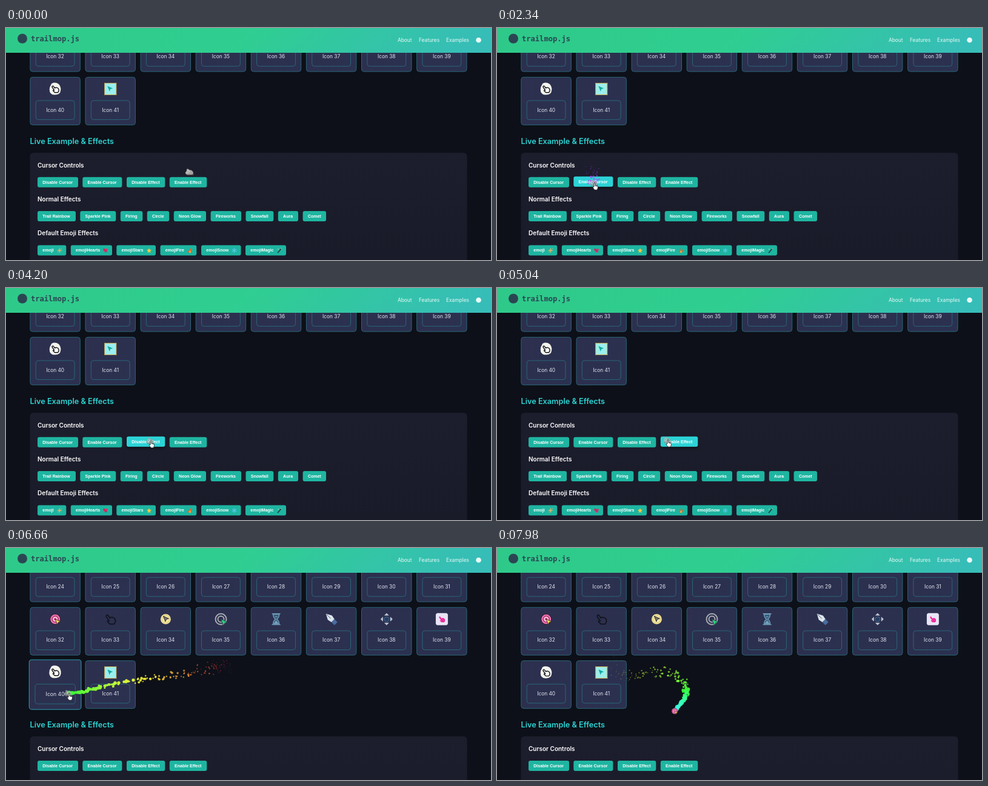
These frames come from a looping animation (800x384 px, 8 s). An HTML page with a canvas:

```html
<!DOCTYPE html>
<html lang="en">
<head>
<meta charset="utf-8">
<title>Cursor effects</title>
<style>
  html, body { margin: 0; width: 100%; height: 100%; overflow: hidden; background: #0d1018; }
  svg, canvas { position: absolute; left: 0; top: 0; width: 800px; height: 384px; }
  text { font-family: Inter, sans-serif; }
  .card { fill: url(#cardFill); stroke: #2a6577; stroke-width: 1; }
  .inner { fill: none; stroke: #296d7c; stroke-width: .9; }
  .label { fill: #e6e8f0; font-size: 8.33px; text-anchor: middle; }
  .on .card { stroke: #2c9db0; }
  .button rect { fill: #1eb5a1; }
  .button text { fill: #fff; font: bold 7px "Liberation Sans", Arial, sans-serif; }
  .button.on { filter: drop-shadow(0 2px 2px #0008); }
  .button.on rect { fill: #2cd3d6; }
  .h2 { fill: #2dd4d4; font-size: 12.7px; font-weight: 600; }
  .h3 { fill: #fff; font-size: 10px; font-weight: 600; }
  .nav { fill: #e9fbf7; font-size: 8.33px; }
  .brand { fill: #2b4653; font: bold 12.1px "DejaVu Sans Mono", monospace; }
</style>
</head>
<body>
<svg viewBox="0 0 800 384">
  <defs>
    <linearGradient id="bar" x1="0" y1="0" x2="1" y2=".05">
      <stop stop-color="#2ec989"/><stop offset=".5" stop-color="#2fce90"/><stop offset="1" stop-color="#37bdb8"/>
    </linearGradient>
    <linearGradient id="cardFill" x1="0" y1="0" x2="1" y2="1">
      <stop stop-color="#2d2f4e"/><stop offset="1" stop-color="#2b3150"/>
    </linearGradient>
    <linearGradient id="panelFill" x1="0" y1="0" x2="0" y2="1">
      <stop stop-color="#1d1e2d"/><stop offset="1" stop-color="#191a28"/>
    </linearGradient>
    <path id="arrow" d="M0 0L9 4L5 5.2L3.5 9Z"/>
    <path id="point" d="M-7-6Q-5-8-3.500-5.500L-1-2Q3-5 7-1Q10 4 6 8L-1 8L-5 4Q-5 2-2 3L-7-4Z" stroke-linejoin="round"/>
    <g id="icon32">
      <circle r="8.500" fill="#f678b5" stroke="#322034" stroke-width="1.2"/>
      <circle r="5" fill="#ffc0d8" stroke="#a72c69" stroke-width="1.5"/><circle r="2" fill="#c92c75"/>
      <use href="#arrow" fill="#ffe15a" stroke="#3a2630" stroke-width=".9"/>
    </g>
    <g id="icon33"><use href="#point" fill="none" stroke="#11131b" stroke-width="1.7"/></g>
    <g id="icon34">
      <circle r="8.500" fill="#f3e6a1"/><circle r="6.500" fill="none" stroke="#d9c568"/>
      <use href="#arrow" x="-4" y="-5" fill="#77736a" stroke="#34343a"/>
    </g>
    <g id="icon35">
      <circle r="9" fill="none" stroke="#a7abb0" stroke-width="2"/>
      <circle r="5" fill="none" stroke="#a7abb0" stroke-width="2"/>
      <use href="#arrow" transform="scale(1.2)" fill="#2bd478" stroke="#2b3050" stroke-width=".7"/>
    </g>
    <g id="icon36" stroke="#6d99b5" stroke-width="1.500">
      <path d="M-7-9H7M-7 9H7"/>
      <path d="M-5-8Q-5-3-1 0Q-5 3-5 8H5Q5 3 1 0Q5-3 5-8Z" fill="#315673"/>
      <path d="M-3 7L0 3L3 7ZM-2-4H2" fill="#7fb4cf"/>
    </g>
    <g id="icon37">
      <path d="M-9-9L1-6L5 0L0 5L-6 1Z" fill="#dce6ed"/><path d="M-8-8L-1-1" stroke="#516072"/>
      <path d="M5 0L10 5L5 10L0 5Z" fill="#4a6da0"/>
    </g>
    <g id="icon38" fill="#bdc7d1">
      <path d="M-4-6L0-10L4-6ZM-4 6L0 10L4 6ZM-6-4L-10 0L-6 4ZM6-4L10 0L6 4Z"/>
      <circle r="4" fill="#263d63" stroke="#4b6b91"/>
    </g>
    <g id="icon39">
      <rect x="-10" y="-10" width="20" height="20" rx="3.500" fill="#e8e4f5"/>
      <use href="#point" transform="scale(.65)" fill="#ed2f9b"/>
    </g>
    <g id="icon40">
      <path d="M-6-9Q0-12 6-8Q11-2 8 6Q4 11-5 9Q-11 6-9-3Z" fill="#f4f4ee"/>
      <use href="#point" transform="scale(.72)" fill="#fff" stroke="#17181c" stroke-width="2"/>
    </g>
    <g id="icon41">
      <rect x="-9.500" y="-9.500" width="19" height="19" fill="#9ceeed" stroke="#d7b85b"/>
      <path d="M-10-10h.1M0-10h.1M10-10h.1M-10 0h.1M10 0h.1M-10 10h.1M0 10h.1M10 10h.1" stroke="#edb83f" stroke-width="3"/>
      <use href="#arrow" x="-5" y="-5" fill="#15aaa2"/>
    </g>
    <g id="sparkles" fill="#d5b06f"><path d="M0-4L1-1L4 0L1 1L0 4L-1 1L-4 0L-1-1ZM3-4v2M2-3h2M-3 2v2" stroke="#d5b06f" stroke-width=".5"/></g>
    <g id="heart"><path d="M0 4L-4-1Q-3-5 0-2Q3-5 4-1Z" fill="#e12f6b"/><path d="M-3-3L3 3" stroke="#8d244e"/></g>
    <g id="star"><path d="M0-4L1.300-1.400L4-1L2 1L2.500 4L0 2.600L-2.500 4L-2 1L-4-1L-1.300-1.400Z" fill="#f2c443"/></g>
    <g id="fire"><path d="M0-4Q4-1 3 2Q2 4 0 4Q-4 4-3 0L-1 1Z" fill="#dd6931"/><path d="M0 0Q3 3 0 4Q-2 3 0 0Z" fill="#f4bd52"/></g>
    <g id="snow"><path d="M0-4V4M-3.500-2L3.500 2M-3.500 2L3.500-2" stroke="#5bc9ea" stroke-width="1.200"/></g>
    <g id="wand"><path d="M-3 4L3-3" stroke="#253944" stroke-width="1.700"/><path d="M2-4L4-2M-2-3v2" stroke="#d6d9b2"/></g>
  </defs>
  <g id="page"></g>
  <rect width="800" height="41" fill="url(#bar)"/>
  <circle cx="27" cy="17.500" r="8" fill="#2b4653"/>
  <text class="brand" x="41" y="21.500">trailmop.js</text>
  <text class="nav" x="646" y="23">About</text>
  <text class="nav" x="681" y="23">Features</text>
  <text class="nav" x="726" y="23">Examples</text>
  <circle cx="779.500" cy="20" r="4.300" fill="#e9fbf7"/>
</svg>
<canvas width="800" height="384"></canvas>
<svg viewBox="0 0 800 384">
  <g id="pointer">
    <g id="rat">
      <path d="M-6 4Q-9 1-5-1Q-6-5-3-5L0-3Q5-3 6 2Q6 5 2 5H-4Z" fill="#a5a5a3"/>
      <path d="M-5-1Q-3-4 0-1L-2 2L-5 2Z" fill="#d6d2cc"/>
      <path d="M-5 5H6M5 3L7 5" fill="none" stroke="#725e55"/><circle cx="-3" r=".7" fill="#292b30"/>
    </g>
    <use id="target" href="#icon32" transform="scale(.58)"/>
    <use id="nativeArrow" href="#arrow" fill="#fff" stroke="#222" stroke-width=".6"/>
    <path id="hand" d="M0 1Q1-1 2 1V5L6 6Q7 7 6 10L5 12H1L-2 8Q-2 6 0 7Z" fill="#fff" stroke="#17191f" stroke-width=".8"/>
  </g>
</svg>
<script>
const LOOP = 8000, STEP = 60, LIFE = 700;
const $ = id => document.getElementById(id);
const page = $('page'), ctx = document.querySelector('canvas').getContext('2d');
const targets = [];

function card(number, x, y) {
  const icon = number > 31 ? `<use href="#icon${number}" x="${x + 41.3}" y="${y + 19.5}"/>` : '';
  targets.push({ x, y, w: 82.4, h: 79, card: true });
  return `<g class="hit"><rect class="card" x="${x}" y="${y}" width="82.4" height="79" rx="4"/>${icon}
    <rect class="inner" x="${x + 9.3}" y="${y + 38.7}" width="63.8" height="31.500" rx="4"/>
    <text class="label" x="${x + 41.2}" y="${y + 57.2}">Icon ${number}</text></g>`;
}

function button(label, x, right, y, emoji) {
  const w = right - x;
  targets.push({ x, y, w, h: 17 });
  const mark = emoji ? `<use href="#${emoji}" x="${right - 11}" y="${y + 8.700}"/>` : '';
  return `<g class="hit button"><rect x="${x}" y="${y}" width="${w}" height="17" rx="3"/>
    <text x="${x + 8.3}" y="${y + 10.8}">${label}</text>${mark}</g>`;
}

const buttonRow = (y, items) => items.map(([label, x, right, emoji]) => button(label, x, right, y, emoji)).join('');
const heading = (level, text, x, y) => `<text class="h${level}" x="${x}" y="${y}">${text}</text>`;

let markup = '';
for (let n = 24; n < 42; n++)
  markup += card(n, 39.9 + (n % 8) * 91.1, -95.2 + Math.floor((n - 24) / 8) * 88.3);
markup += heading(2, 'Live Example &amp; Effects', 39.5, 192.3)
  + '<rect x="39.500" y="206.500" width="721" height="230" rx="6" fill="url(#panelFill)"/>'
  + heading(3, 'Cursor Controls', 52, 230.5)
  + buttonRow(246.8, [['Disable Cursor', 52, 119], ['Enable Cursor', 126.3, 191.4],
    ['Disable Effect', 199, 262.3], ['Enable Effect', 269.8, 331.3]])
  + heading(3, 'Normal Effects', 52, 287)
  + buttonRow(303, [['Trail Rainbow', 52, 115], ['Sparkle Pink', 122.3, 181.3], ['Firing', 188.8, 225.3],
    ['Circle', 232.8, 269.2], ['Neon Glow', 276.8, 330], ['Fireworks', 337.6, 388],
    ['Snowfall', 395.5, 441.3], ['Aura', 448.8, 482], ['Comet', 489.6, 528]])
  + heading(3, 'Default Emoji Effects', 52, 343.3)
  + buttonRow(359.5, [['emoji', 52, 99.3, 'sparkles'], ['emojiHearts', 106.8, 175, 'heart'],
    ['emojiStars', 182.3, 247, 'star'], ['emojiFire', 254.5, 314.3, 'fire'],
    ['emojiSnow', 322, 387.5, 'snow'], ['emojiMagic', 395, 462, 'wand']]);
page.innerHTML = markup;
page.querySelectorAll('.hit').forEach((el, i) => targets[i].el = el);

// Each stop is time, x, y; a repeated position is a rest.
const path = [
  [0, 303, 238], [60, 303, 238], [540, 102, 257], [1380, 102, 257], [1700, 150, 225],
  [2050, 160, 256], [2400, 160, 256], [2750, 140, 225], [2950, 165, 215], [3150, 190, 208],
  [3260, 202, 214], [3420, 222, 232], [3700, 235, 254], [4150, 235, 254], [4500, 300, 225],
  [4750, 281, 251], [5160, 281, 251], [5300, 272, 238], [5500, 290, 232], [5700, 320, 220],
  [5940, 348, 211], [6180, 358, 194], [6330, 300, 208], [6500, 180, 224], [6600, 125, 238],
  [6660, 103, 240], [6780, 100, 235], [6980, 82, 125], [7160, 82, 125], [7300, 135, 165],
  [7420, 185, 188], [7520, 220, 213], [7620, 270, 203], [7720, 307, 222], [7820, 312, 242],
  [7900, 305, 255], [7980, 293, 270]
];
const hues = [[0, -300], [2800, 20], [3420, 115], [5000, 115], [5400, 150], [5880, 190],
  [5950, 260], [6200, 350], [6660, 485], [7300, 740], [7750, 830], [7980, 900]];

function segment(keys, t) {
  let i = 0;
  while (i < keys.length - 2 && t > keys[i + 1][0]) i++;
  const span = keys[i + 1][0] - keys[i][0];
  return { i, span, u: Math.min(1, Math.max(0, (t - keys[i][0]) / span)) };
}

const same = (a, b) => a[1] === b[1] && a[2] === b[2];
function slope(i, axis) {
  const a = path[i - 1], b = path[i], c = path[i + 1];
  return !a || !c || same(a, b) || same(b, c) ? 0 : (c[axis] - a[axis]) / (c[0] - a[0]);
}

function position(t) {
  const { i, span, u } = segment(path, t), v = 1 - u;
  return [1, 2].map(k => v * v * (1 + 2 * u) * path[i][k] + u * u * (3 - 2 * u) * path[i + 1][k]
    + span * u * v * (v * slope(i, k) - u * slope(i + 1, k)));
}

function hueAt(t) {
  const { i, u } = segment(hues, t);
  return hues[i][1] + u * (hues[i + 1][1] - hues[i][1]);
}

const random = n => { const s = Math.sin(n * 127.1 + 31.7) * 43758.5453; return s - Math.floor(s); };

// Particles are born along the moving pointer, then drift apart and shrink.
const particles = [];
for (let i = 0, n = 0; i * 6 < LOOP; i++) {
  const born = i * 6, [x, y] = position(born), [px, py] = position(born - 6);
  if (Math.hypot(x - px, y - py) < .2 || (born > 3850 && born < 5160)) continue;
  for (let k = 0; k < 2; k++, n++) {
    const angle = random(n) * 2 * Math.PI, speed = random(n + .3) * .032;
    particles.push({ born, x, y, vx: Math.cos(angle) * speed, vy: Math.sin(angle) * speed,
      size: (1.7 + 2 * random(n + .6)) * (born > 5160 && born < 5960 ? .6 : 1), hue: hueAt(born) });
  }
}

function drawParticles(t) {
  ctx.clearRect(0, 0, 800, 384);
  for (const p of particles) {
    const age = t - p.born, left = 1 - age / LIFE;
    if (age < 0 || left <= 0) continue;
    ctx.globalAlpha = Math.min(1, left * 1.25);
    ctx.fillStyle = `hsl(${p.hue} 100% 61%)`;
    ctx.beginPath();
    ctx.arc(p.x + p.vx * age, p.y + p.vy * age, p.size * left ** 1.2, 0, 2 * Math.PI);
    ctx.fill();
  }
}

function scrollAt(t) {
  const u = Math.min(1, Math.max(0, (t - 5820) / 360));
  return 105.2 * u * u * (3 - 2 * u);
}

function hover(x, y) {
  let found = false;
  for (const b of targets) {
    const on = x >= b.x && x <= b.x + b.w && y >= b.y && y <= b.y + b.h;
    b.el.classList.toggle('on', on);
    const cx = b.x + b.w / 2, cy = b.y + b.h / 2;
    b.el.setAttribute('transform', !on ? '' : b.card
      ? `translate(${cx} ${cy}) scale(1.04) translate(${-cx} ${-cy})` : 'translate(0 -1)');
    found ||= on;
  }
  return found;
}

const show = (id, visible) => $(id).setAttribute('display', visible ? 'inline' : 'none');

function render(t) {
  const [x, y] = position(t), scroll = scrollAt(t);
  page.setAttribute('transform', `translate(0 ${scroll})`);
  const over = y > 41 && hover(x, y - scroll);
  const native = t > 1300 && t < 2250;
  show('rat', !native && t < 7080);
  show('target', t >= 7080);
  show('nativeArrow', native && !over);
  show('hand', over && t > 1300);
  $('rat').setAttribute('opacity', over ? .65 : 1);
  $('pointer').setAttribute('transform', `translate(${x} ${y})`);
  drawParticles(t);
}

const start = performance.now();
function tick() {
  const t = (performance.now() - start) % LOOP;
  render(Math.floor(t / STEP) * STEP);
  requestAnimationFrame(tick);
}
tick();
</script>
</body>
</html>
```
